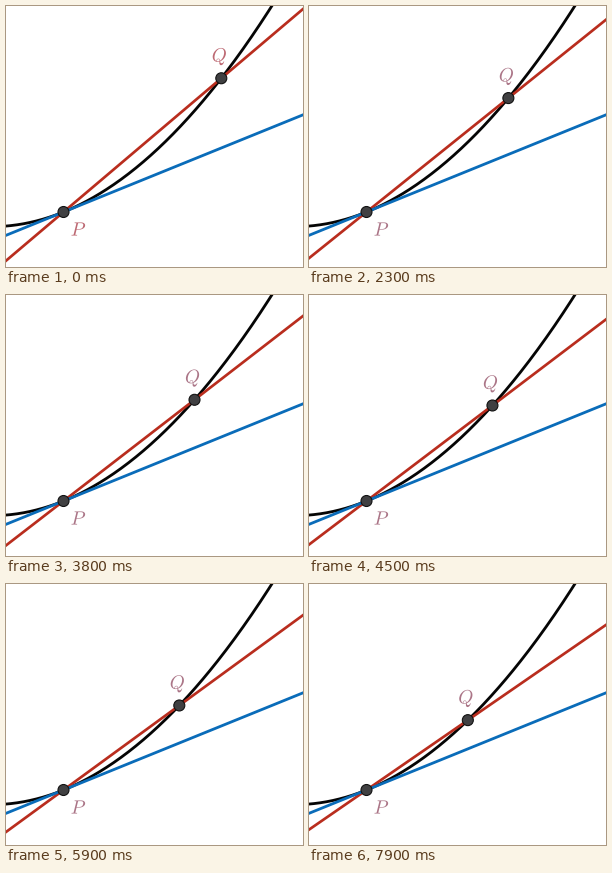
A matplotlib script that plays this animation: 297 by 261 pixels, repeating every 8000 ms.

```python
import numpy as np
import matplotlib.pyplot as plt
from matplotlib.animation import FuncAnimation
from matplotlib.patches import Circle, PathPatch
from matplotlib.textpath import TextPath
from matplotlib.transforms import Affine2D

W, H, DPI = 297, 261, 72
FRAMES, STEP_MS = 80, 100

PX, PY = 57.5, 206.0          # fixed point P
SLOPE, BEND = -0.4057, 0.0028  # tangent slope and curvature of the parabola
QX_START, QX_STEP = 215.3, 0.724

plt.rcParams["mathtext.fontset"] = "cm"

fig = plt.figure(figsize=(W / DPI, H / DPI), dpi=DPI, facecolor="white")
ax = fig.add_axes([0, 0, 1, 1])
ax.set_xlim(0, W)
ax.set_ylim(H, 0)
ax.axis("off")


def curve(x):
    d = x - PX
    return PY + SLOPE * d - BEND * d * d


def through_p(slope):
    return [PY + slope * (x - PX) for x in ENDS]


def glyph(letter):
    """Math italic letter outline, centred on the origin, y pointing down."""
    path = TextPath((0, 0), f"${letter}$", size=19.2)
    box = path.get_extents()
    shift = Affine2D().translate(-(box.x0 + box.x1) / 2, -(box.y0 + box.y1) / 2)
    return shift.scale(1, -1).transform_path(path)


def label(letter, x, y):
    patch = PathPatch(glyph(letter), lw=0, zorder=5)
    ax.add_patch(patch)
    place(patch, x, y)
    return patch


def place(patch, x, y):
    patch.set_transform(Affine2D().translate(x, y) + ax.transData)


def dot(x, y):
    return ax.add_patch(Circle((x, y), 5.5, fc="#404042", ec="#111111", lw=1.1, zorder=4))


ENDS = (-10, W + 10)
xs = np.linspace(-10, W + 10, 300)
ax.plot(xs, curve(xs), color="#050505", lw=2.8, zorder=1)
secant, = ax.plot(ENDS, through_p(-0.85), color="#b92d1e", lw=2.7, zorder=2)
ax.plot(ENDS, through_p(SLOPE), color="#0a6cb9", lw=2.8, zorder=3)

dot(PX, PY)
q_dot = dot(QX_START, curve(QX_START))
p_label = label("P", 72.3, 223)
q_label = label("Q", 213.3, 50.8)

WARM = np.array([0.74, 0.41, 0.45])
MUTED = np.array([0.67, 0.46, 0.53])


def draw(i):
    n = max(0, i - 1)
    x = QX_START - QX_STEP * n
    y = curve(x)
    q_dot.center = x, y
    secant.set_ydata(through_p((y - PY) / (x - PX)))
    place(q_label, x - 2, y - 21.7)
    color = WARM + (MUTED - WARM) * min(1, n / 20)
    p_label.set_facecolor(color)
    q_label.set_facecolor(color)
    return secant, q_dot, p_label, q_label


anim = FuncAnimation(fig, draw, frames=FRAMES, interval=STEP_MS,
                     init_func=lambda: draw(0), repeat=True, repeat_delay=0)
plt.show()
```
